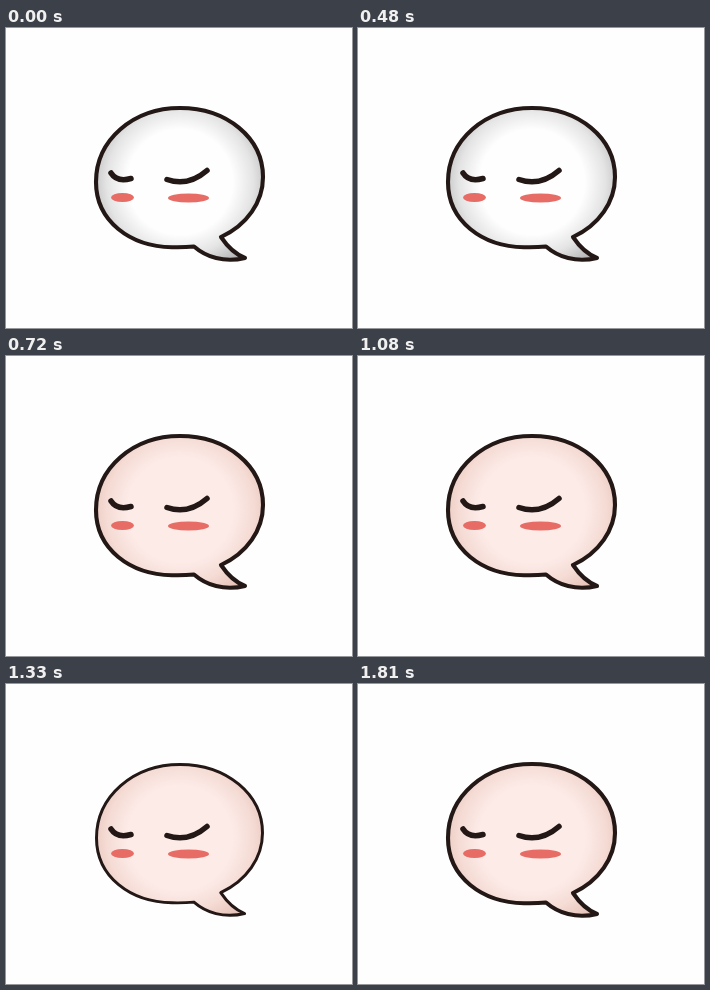
These frames come from a looping animation (346x300 px, 1930 ms). An HTML page:

```html
<!DOCTYPE html>
<html lang="en">
<head>
<meta charset="utf-8">
<title>Blushing speech bubble</title>
<style>
html, body { margin: 0; width: 100%; height: 100%; overflow: hidden; background: #fefefe; }
svg { display: block; width: 100vw; height: 100vh; }
</style>
</head>
<body>
<svg viewBox="0 0 346 300">
  <defs>
    <radialGradient id="white" gradientUnits="userSpaceOnUse" cx="174" cy="154" r="94">
      <stop offset=".56" stop-color="#fefefe"/>
      <stop offset=".78" stop-color="#e4e4e4"/>
      <stop offset="1" stop-color="#b4b4b4"/>
    </radialGradient>
    <radialGradient id="pink" gradientUnits="userSpaceOnUse" cx="174" cy="154" r="94">
      <stop offset=".56" stop-color="#fdebe8"/>
      <stop offset=".78" stop-color="#f5dcd5"/>
      <stop offset="1" stop-color="#e6c3b9"/>
    </radialGradient>
  </defs>
  <g id="bubble" stroke="#231815" stroke-linecap="round" stroke-linejoin="round">
    <path id="body" d="M188 218.500C200 229 218 235 239 230C229 226 221 218 215 209C241 197 257 174 257 149C257 110 221 80 174 80C127 80 90 112 90 154C90 193 124 218.500 166 219.200Q178 219.500 188 218.500Z"/>
    <g id="face">
      <g fill="#e66c65" stroke="none">
        <ellipse cx="116.500" cy="169.500" rx="11.500" ry="4.500"/>
        <ellipse cx="182.500" cy="170" rx="20.500" ry="4.500"/>
      </g>
      <path d="M105 145Q111 154.500 125 150.500M161 151.500Q182 159 201 142.500" fill="none" stroke-width="5.500"/>
    </g>
  </g>
</svg>
<script>
const LOOP = 1930, STEP = 120;
const SWAY = [0, -3, 0, 5];
const [bubble, body, face] = ["bubble", "body", "face"].map(id => document.getElementById(id));

function draw(now) {
  const t = now % LOOP;
  const sway = t < 1080 ? SWAY[Math.floor(t / STEP) % SWAY.length] : 0;
  const blushing = t >= 1080 || (t >= 720 && t < 840);
  const thin = t >= 1330 && t < 1450;
  const hidden = t >= 1450 && t < 1810;

  bubble.setAttribute("visibility", hidden ? "hidden" : "visible");
  body.setAttribute("fill", blushing ? "url(#pink)" : "url(#white)");
  body.setAttribute("stroke-width", thin ? 3 : 4.1);
  body.setAttribute("transform", `translate(173 154) scale(${thin ? 0.994 : 1}) translate(-173 -154)`);
  face.setAttribute("transform", `translate(${sway} 0)`);
}

const start = performance.now();
function tick() {
  draw(performance.now() - start);
  requestAnimationFrame(tick);
}
tick();
</script>
</body>
</html>
```
